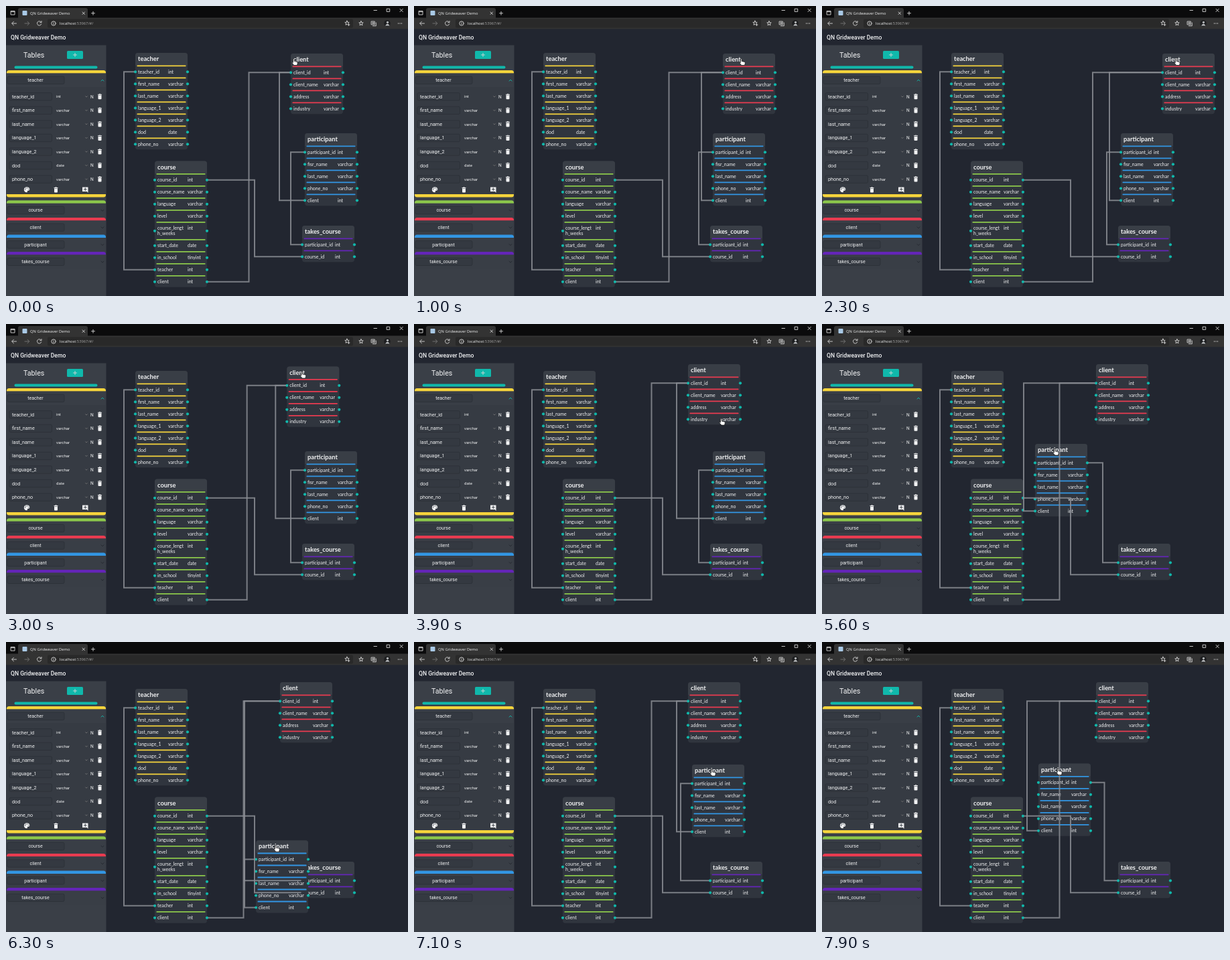
An HTML page for the animation above (8000 ms loop, 600x433 px).

```html
<!DOCTYPE html>
<html lang="en">
<head>
<meta charset="utf-8">
<title>QN Gridweaver Demo</title>
<style>
  html, body { margin: 0; width: 100%; height: 100%; overflow: hidden; background: #222630; }
  svg { display: block; width: 600px; height: 433px; }
  text { fill: #f1f2f3; font-family: Roboto, sans-serif; }
  .node text { font-family: Lato, sans-serif; }
  .ui { font-family: "Open Sans", sans-serif; }
  .icon { fill: none; stroke: #d6d6d6; stroke-width: .9; stroke-linecap: round; stroke-linejoin: round; }
  .dim { stroke: #777; }
  #links path { fill: none; stroke: #8b8e95; stroke-width: 2; opacity: .85; }
</style>
</head>
<body>
<svg id="stage" viewBox="0 0 600 433">
  <g id="nodes"></g>
  <g id="links"></g>
  <g id="sidebar"></g>
  <g id="chrome"></g>
  <g id="cursor">
    <path d="M-2.6-4.2q.9-1.3 1.8 0V-1l4 .9q1.3.4 1.1 1.6L3.5 5H-1.2L-4.2 1.3q-.2-1.3 1.6-.3Z"
      fill="#fff" stroke="#111" stroke-width=".7" stroke-linejoin="round"/>
  </g>
</svg>
<script>
const $ = id => document.getElementById(id);
const LOOP = 8000, STEP = 100, WIDTH = 78, STUB = 17;
const TEAL = '#10b8ab';
const COLORS = {
  teacher: '#f6d43c', course: '#8cc84b', client: '#e93b50',
  participant: '#3296e3', takes_course: '#6425b8'
};

const rect = (x, y, w, h, fill, r = 0, extra = '') =>
  `<rect x="${x}" y="${y}" width="${w}" height="${h}" rx="${r}" fill="${fill}" ${extra}/>`;
const text = (s, x, y, size, extra = '') =>
  `<text x="${x}" y="${y + size * .35}" font-size="${size}" ${extra}>${s}</text>`;
const icon = (d, cls = '', extra = '') => `<path class="icon ${cls}" d="${d}" ${extra}/>`;
const dot = (x, y) => `<circle cx="${x}" cy="${y}" r="2.1" fill="${TEAL}"/>`;

// Tables: position and columns as "name:type"
const tables = {
  teacher: { x: 193, y: 70, cols: 'teacher_id:int first_name:varchar last_name:varchar language_1:varchar language_2:varchar dod:date phone_no:varchar' },
  course: { x: 222, y: 231.5, cols: 'course_id:int course_name:varchar language:varchar level:varchar course_lengt|h_weeks:int start_date:date in_school:tinyint teacher:int client:int' },
  client: { x: 425, y: 71, cols: 'client_id:int client_name:varchar address:varchar industry:varchar' },
  takes_course: { x: 442, y: 328, cols: 'participant_id:int course_id:int' },
  participant: { x: 446, y: 190, cols: 'participant_id:int fisr_name:varchar last_name:varchar phone_no:varchar client:int' }
};

function buildTable(name, table) {
  const color = COLORS[name];
  let y = 19.3, rows = '';
  table.ports = {};
  for (const col of table.cols.split(' ')) {
    const [label, type] = col.split(':');
    const lines = label.split('|');
    const height = lines.length > 1 ? 26 : 18;
    const mid = y + height / 2;
    const first = mid - (lines.length - 1) * 4;
    table.ports[lines[0]] = mid;
    rows += rect(2.5, y - .9, 73, 1.9, color, .6)
      + lines.map((line, i) => text(line, 4, first + i * 8, 7)).join('')
      + text(type, 49, first, 7) + dot(0, mid) + dot(WIDTH, mid);
    y += height;
  }
  return `<g class="node" id="t-${name}">`
    + rect(0, 0, WIDTH, y - 1, '#30353e', 4)
    + `<path d="M0 19V4q0-4 4-4h70q4 0 4 4v15Z" fill="#393e46"/>`
    + text(name, 4, 9, 9.3, 'font-weight="700"') + rows + '</g>';
}

const links = [
  ['teacher', 'teacher_id', 'course', 'teacher'],
  ['course', 'course_id', 'takes_course', 'course_id'],
  ['course', 'client', 'client', 'client_id'],
  ['participant', 'client', 'client', 'client_id'],
  ['participant', 'participant_id', 'takes_course', 'participant_id']
];

function linkPath([fromName, fromCol, toName, toCol]) {
  const a = tables[fromName], b = tables[toName];
  const facing = b.x - a.x - WIDTH > 2 * STUB;
  const start = facing ? a.x + WIDTH + 1.5 : a.x - 1.5;
  const mid = facing ? (a.x + WIDTH + b.x) / 2 : Math.min(a.x, b.x) - STUB;
  return `M${start} ${a.y + a.ports[fromCol]}H${mid}V${b.y + b.ports[toCol]}H${b.x - 1.5}`;
}

function trash(x, y) {
  return `<path d="M${x - 2.5} ${y - 2}h5v5q0 1-1 1h-3q-1 0-1-1ZM${x - 3} ${y - 3.6}h1.7l.6-.7h1.4l.6.7H${x + 3}v1h-6Z" fill="#f1f2f3"/>`;
}

function buildSidebar() {
  const field = (x, y, w) => rect(x, y - 5.7, w, 11.4, '#343941', 2, 'stroke="#2a2e36" stroke-width=".7"');
  const cap = (y, color) => `<path d="M1 ${y + 4.5}v-1q0-3.5 3.5-3.5h141q3.5 0 3.5 3.5v1Z" fill="${color}"/>`;
  const head = (name, y) => cap(y - 14.7, COLORS[name]) + rect(1, y - 10.2, 148, 20.5, '#393e46')
    + field(2, y, 85) + text(name, 44, y, 7, 'text-anchor="middle"');

  let out = rect(0, 58, 149.5, 375, '#3a3f47')
    + text('Tables', 26, 72.8, 10.7)
    + rect(91, 67, 24, 12, TEAL, 1.5) + icon('M100.5 73h5M103 70.500v5', '', 'stroke="#fff"')
    + rect(12.5, 89.5, 124, 4, TEAL, 2)
    + head('teacher', 110.8) + rect(1, 121, 148, 160, '#363b43')
    + icon('M142 112l2-2 2 2', '', `style="stroke:${TEAL}"`);

  tables.teacher.cols.split(' ').forEach((col, i) => {
    const [name, type] = col.split(':');
    const y = 135.3 + i * 20.55;
    out += field(5, y, 63.5) + text(name, 9, y, 7.2) + text(type, 75, y, 6.1)
      + icon(`M118.700 ${y - .6}l1.300 1.300 1.300-1.300`, 'dim')
      + text('N', 126, y, 6.6) + trash(140, y);
  });

  out += '<path d="M31 270.200c-5.500 0-5.500 8 0 8 1.800 0 0-2.500 1.800-2.500 4 0 3.200-5.500-1.800-5.500Z" fill="#f1f2f3"/>'
    + [[28.7, 274], [29.7, 272], [32, 271.8], [33.8, 273.3]].map(([x, y]) => `<circle cx="${x}" cy="${y}" r=".65" fill="#363b43"/>`).join('')
    + trash(74.5, 274.6)
    + '<path d="M114 270.500h8.500v8.200l-1.800-1.700H114Z" fill="#f1f2f3"/>'
    + icon('M116.300 273.700h4M118.300 271.700v4', '', 'style="stroke:#363b43"')
    + `<path d="M1 281v1q0 3.500 3.500 3.500h141q3.500 0 3.500-3.500v-1Z" fill="${COLORS.teacher}"/>`;

  ['course', 'client', 'participant', 'takes_course'].forEach((name, i) => {
    const y = 305 + i * 25.6;
    out += head(name, y) + icon(`M142 ${y - .7}l2 2 2-2`, '', 'style="stroke:#24282f"');
  });
  return out;
}

function buildChrome() {
  const star = (x, y) => {
    let d = '';
    for (let i = 0; i < 10; i++) {
      const a = i * Math.PI / 5 - Math.PI / 2, r = i % 2 ? 1.5 : 3.4;
      d += `${i ? 'L' : 'M'}${(x + r * Math.cos(a)).toFixed(1)} ${(y + r * Math.sin(a)).toFixed(1)}`;
    }
    return icon(d + 'Z');
  };
  return rect(0, 0, 600, 18, '#0b0b0c')
    + icon('M7.500 7.500h5.500v5.500h-5.500ZM7.500 8.700h5.500')
    + '<path d="M18 18V6q0-3 3-3h98q3 0 3 3v12Z" fill="#333"/>'
    + rect(24.5, 7, 7, 7, '#a9c9e6', 1)
    + text('QN Gridweaver Demo', 36, 10.5, 5.8, 'class="ui"')
    + icon('M114 9l3.500 3.500M117.500 9l-3.500 3.500M127.500 10.800h5M130 8.300v5')
    + icon('M549 6.500h4.500M568.500 4.200h4.200v4.200h-4.200ZM588 4.300l4.300 4.300M592.300 4.300L588 8.600')
    + rect(0, 17.5, 600, 17, '#333')
    + rect(62, 19.5, 456, 13, '#292929', 2)
    + icon('M15.500 26h-6.500M11.500 23.200L8.700 26l2.800 2.800')
    + icon('M28 26h6.500M32 23.200l2.800 2.800-2.800 2.800', 'dim')
    + icon('M52.300 24a3.200 3.200 0 1 0 .4 3M53 22.500v2.200h-2.200')
    + '<circle class="icon" cx="71" cy="26" r="3.200"/>' + icon('M71 25.800v1.700M71 24.300v.1')
    + text('localhost<tspan fill="#a5a5a5">:53967/#/</tspan>', 80, 26, 5.8, 'class="ui"')
    + star(509, 25.5) + '<circle cx="511.500" cy="28" r="2" fill="#292929"/>' + icon('M510 28h3M511.500 26.500v3')
    + star(530, 26)
    + icon('M545.500 23h4.800v4.800h-4.800ZM547.500 29.700h4.800v-4.800M548 24v2.800M546.600 25.400h2.800')
    + '<circle cx="569" cy="26" r="4.800" fill="#1d1e20"/>'
    + '<circle cx="569.500" cy="24.300" r="1.600" fill="#b9bbbd"/><path d="M566 29.500q3.500-6 6.500 0Z" fill="#b9bbbd"/>'
    + [585.5, 588, 590.5].map(x => `<circle cx="${x}" cy="26" r=".7" fill="#d6d6d6"/>`).join('')
    + rect(0, 34.5, 600, 24, '#222630')
    + text('QN Gridweaver Demo', 7, 46.5, 8.6, 'font-weight="500"');
}

// Motion tracks: [time, x, y]
const clientTrack = [
  [0, 425, 71], [400, 433, 71], [900, 454, 71], [1000, 461, 71], [1700, 516, 71],
  [1900, 518, 71], [2300, 508, 71], [2700, 451, 69], [3100, 414, 62], [3400, 409, 60]
];
const gripTrack = [[0, 6, 12.5], [1000, 29, 12.5], [2300, 22, 12.5], [3400, 25, 12.5]];
const reachTrack = [[3500, 434, 72.5], [3900, 460, 146], [4200, 477, 202]];
const partTrack = [
  [4250, 446, 190], [4500, 437, 266], [4700, 405, 296], [4900, 370, 284], [5200, 329, 225],
  [5600, 318, 179], [5900, 320, 225], [6200, 355, 291], [6350, 382, 297], [6700, 432, 262],
  [6900, 433, 215], [7100, 415, 183], [7200, 401, 180], [7900, 323, 181.5]
];

// Monotone cubic interpolation, held at both ends
function sample(track, t, k) {
  const last = track.length - 1;
  if (t <= track[0][0]) return track[0][k];
  if (t >= track[last][0]) return track[last][k];
  const i = track.findIndex(p => p[0] > t) - 1;
  const slope = j => j < 0 || j >= last ? 0 : (track[j + 1][k] - track[j][k]) / (track[j + 1][0] - track[j][0]);
  const tangent = j => {
    const a = slope(j - 1), b = slope(j);
    return a * b <= 0 ? 0 : 2 * a * b / (a + b);
  };
  const [p, q] = [track[i], track[i + 1]];
  const h = q[0] - p[0], u = (t - p[0]) / h, v = 1 - u;
  return v * v * (1 + 2 * u) * p[k] + u * u * (3 - 2 * u) * q[k]
    + h * u * v * (v * tangent(i) - u * tangent(i + 1));
}
const at = (track, t) => ({ x: sample(track, t, 1), y: sample(track, t, 2) });
const place = (el, { x, y }) => el.setAttribute('transform', `translate(${x.toFixed(2)} ${y.toFixed(2)})`);

$('nodes').innerHTML = Object.entries(tables).map(([name, t]) => buildTable(name, t)).join('');
$('links').innerHTML = links.map(() => '<path/>').join('');
$('sidebar').innerHTML = buildSidebar();
$('chrome').innerHTML = buildChrome();
const linkEls = [...$('links').children];

function cursorAt(t) {
  if (t >= 3500 && t < 4200) return at(reachTrack, t);
  const { client, participant } = tables;
  if (t >= 4200) return { x: participant.x + 31, y: participant.y + 12 };
  const grip = at(gripTrack, t);
  return { x: client.x + grip.x, y: client.y + grip.y };
}

function draw(now) {
  const t = Math.floor(now % LOOP / STEP) * STEP;
  Object.assign(tables.client, at(clientTrack, t));
  Object.assign(tables.participant, at(partTrack, t));
  for (const name in tables) place($('t-' + name), tables[name]);
  links.forEach((link, i) => linkEls[i].setAttribute('d', linkPath(link)));
  place($('cursor'), cursorAt(t));
}

let origin;
function tick(now) {
  origin ??= now;
  draw(now - origin);
  requestAnimationFrame(tick);
}
draw(0);
requestAnimationFrame(tick);
</script>
</body>
</html>
```
